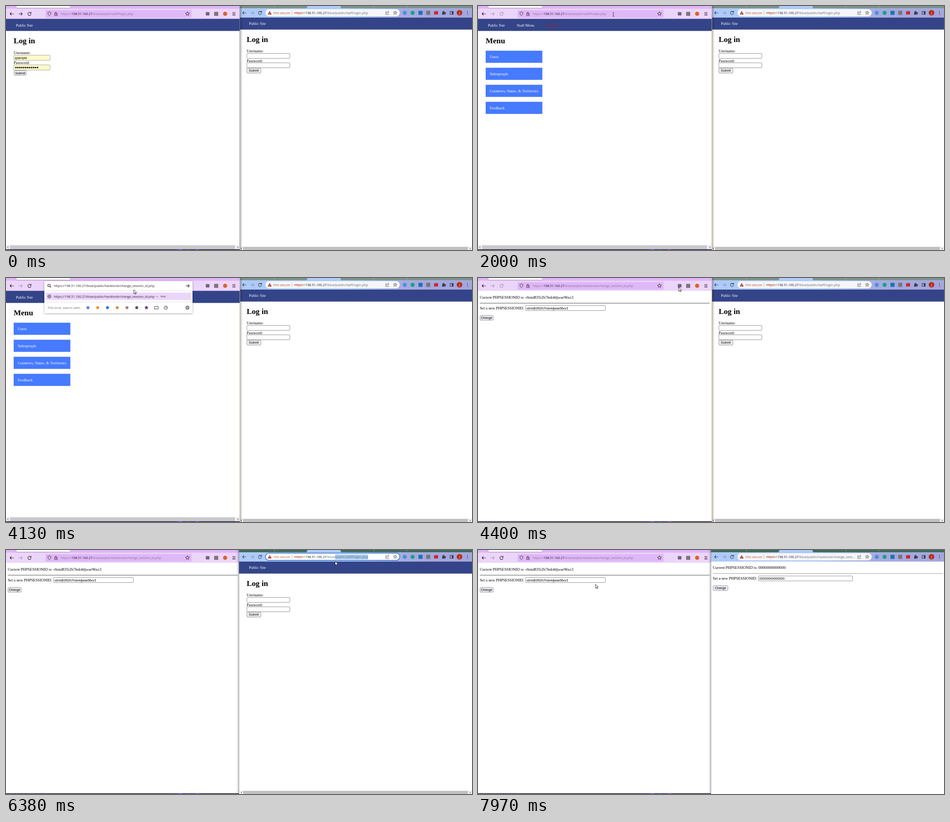
Animation, 1032 px wide and 543 px high, one loop 8 s. Source, as an HTML page:

```html
<!DOCTYPE html>
<html lang="en">
<head>
<meta charset="utf-8">
<title>Two browsers</title>
<style>
html, body { margin: 0; width: 100%; height: 100%; overflow: hidden; background: #fff; }
svg { display: block; width: 1032px; height: 543px; }
.serif { font: 8.65px "Liberation Serif", serif; }
.head { font: bold 17.2px "Liberation Serif", serif; }
.ui { font: 7.1px "Open Sans", sans-serif; }
.omni { font: 7.2px "Open Sans", sans-serif; }
.sub { font: 6.1px "Open Sans", sans-serif; }
.form { font: 7.2px "Liberation Sans", sans-serif; }
.code { font: 6.85px "Liberation Sans", sans-serif; }
.pop { filter: drop-shadow(0 1px 2px rgba(0,0,0,.35)); }
</style>
</head>
<body>
<svg id="stage" viewBox="0 0 1032 543"></svg>
<script>
const LOOP = 8000, STEP = 132.8;
const HOST = '198.51.100.27', SESSION = 'vbrnd835t2h7hsk4djwae96xz3';
const TOOL = 'public/hacktools/change_session_id.php';
const INK = '#2b2233';

const rect = (x, y, w, h, fill, more = '') =>
  `<rect x="${x}" y="${y}" width="${w}" height="${h}" fill="${fill}" ${more}/>`;
const box = (x, y, w, h, fill, line, r = 1) =>
  rect(x + .5, y + .5, w - 1, h - 1, fill, `rx="${r}" stroke="${line}" stroke-width=".8"`);
const text = (x, y, str, cls = 'serif', fill = '#000', more = '') =>
  `<text x="${x}" y="${y}" class="${cls}" fill="${fill}" ${more}>${str}</text>`;
const path = (d, color = INK, w = 1.1, fill = 'none') =>
  `<path d="${d}" fill="${fill}" stroke="${color}" stroke-width="${w}" stroke-linejoin="round"/>`;
const dot = (x, y, r, fill) => `<circle cx="${x}" cy="${y}" r="${r}" fill="${fill}"/>`;
// Visible between each pair of times
const on = (times, body) => `<g data-on="${times}">${body}</g>`;

const arrow = (x, y, dir, color) =>
  path(`M${x - 4 * dir} ${y}h${8 * dir}m${-3.3 * dir} -3.3l${3.3 * dir} 3.3l${-3.3 * dir} 3.3`, color);
const reload = (x, y, color) =>
  path(`M${x + 3} ${y - 2}A3.6 3.6 0 1 0 ${x + 3.5} ${y + 1}M${x + 3.6} ${y - 4.2}v2.9h-2.9`, color);
const star = (x, y, r, fill = 'none', color = INK) => {
  const points = Array.from({ length: 10 }, (_, i) => {
    const a = i * Math.PI / 5, q = i % 2 ? r * .45 : r;
    return `${x + q * Math.sin(a)} ${y - q * Math.cos(a)}`;
  });
  return path(`M${points.join('L')}Z`, color, .9, fill);
};
const globe = (x, y) =>
  path(`M${x - 3.8} ${y}a3.8 3.8 0 1 0 7.6 0a3.8 3.8 0 1 0 -7.6 0h7.6M${x} ${y - 3.8}q-3.6 3.8 0 7.6q3.6 -3.8 0 -7.6`, '#444', .8);
const shield = path('M92.5 14.5L96 13.2L99.5 14.5Q99.5 19.5 96 21.5Q92.5 19.5 92.5 14.5Z', INK, .9);
const lock = path('M107.8 17h5.6v4.3h-5.6zM108.9 17v-1.5a1.7 1.7 0 0 1 3.4 0v1.5', INK, .9) +
  path('M107 13.5l7.5 8', '#c8374a', .8);

const pageUrl = (x, y, tail, cls, dim, strike) => text(x, y,
  `${strike ? `<tspan fill="#c5473a" text-decoration="line-through">https:</tspan>//` : 'https://'}` +
  `<tspan fill="#221a2c">${HOST}</tspan>/blue/${tail}`, cls, dim);
const plainUrl = (x, y, tail, cls = 'ui', fill = INK, more) =>
  text(x, y, `https://${HOST}/blue/${tail}`, cls, fill, more);

const sessionPage = (x, y, id, width, lineFill, idClass, inset) =>
  text(x, y, `Current PHPSESSIONID is: ${id}`) +
  rect(x, y + 10, 509, 1, lineFill) +
  text(x, y + 24.3, 'Set a new PHPSESSIONID:') +
  box(x + 100.5, y + 15.5, width, 12, '#fff', '#777') +
  text(x + 103, y + 24.2, id, idClass) +
  box(x, y + 37, inset, 12, '#ebebee', '#858590', 2) +
  text(x + inset / 2, y + 45.6, 'Change', 'form', '#000', 'text-anchor="middle"');

const searchRow = y => text(92, y + 2.6, 'This time, search with:', 'ui', '#77727c') +
  ['#4285f4', '#e8962e', '#2878e0', '#d98b45', '#a08090', '#555'].map((c, i) =>
    dot(181.5 + i * 21.6, y, 3.2, c)).join('') +
  star(311, y, 4, '#5b3a83', '#5b3a83') +
  path(`M329 ${y - 2.8}h8v5.8h-8z`, INK, .9) +
  path(`M350.2 ${y}a3.8 3.8 0 1 0 7.6 0a3.8 3.8 0 1 0 -7.6 0M354 ${y - 2.5}v2.7h2`, INK, .9) +
  path(`M398.6 ${y}a3.3 3.3 0 1 0 6.6 0a3.3 3.3 0 1 0 -6.6 0`, INK, 1.2) +
  path(`M400.8 ${y}a1.1 1.1 0 1 0 2.2 0a1.1 1.1 0 1 0 -2.2 0`, INK, .8);

const history = [
  ['PLORVENTHAWIK » Free Retro Games Pre-installed for PC', 'plorventhawik.test', '#c0302a'],
  ['Wuqo', 'wuqo.test', '#15241b'],
  ['Change PHPSESSIONID', `${HOST}/blue/${TOOL}`],
  ['DrelMont Security Gardener - Login', 'security.drelmont.test/login.jsp'],
  ['Plim Racks Community Edition', 'http://plimracks'],
  ['DrelMont CTF', 'ctf.drelmont.test', '#55565c']
].map(([title, link, color], i) => {
  const y = 41 + i * 29;
  return (color ? dot(96, y, 3.8, color) : globe(96, y)) +
    text(106, y + 2.7, title, 'ui', '#1b1720') + text(106, y + 13.1, link, 'sub', '#74309a');
}).join('');

const leftBar =
  rect(0, 0, 518, 7, '#dfb5f7') + box(22, -3, 121, 8, '#fff', '#a48ab0') +
  rect(0, 6, 518, 22.5, '#ecd5fb') + rect(87.5, 9, 323.5, 17, '#dfb8f6', 'rx="2"') +
  arrow(13, 17.5, -1, INK) +
  on('0 1210', arrow(32, 17.5, 1, INK)) + on('1210 9000', arrow(32, 17.5, 1, '#a892b5')) +
  on('0 1210 2130 4260 5080 9000', reload(52, 17.5, INK)) +
  on('1210 2130 4260 5080', reload(52, 17.5, '#a892b5')) +
  shield + lock + star(402, 17.3, 4.5) +
  rect(442.5, 13.5, 8, 7.5, '#6d6476', 'rx="1"') + rect(461, 13, 9, 9, '#7b757f') +
  dot(485.3, 17.3, 4.6, '#d9622b') +
  path('M501.5 14.5h6.5m-6.5 2.8h6.5m-6.5 2.8h6.5') +
  on('0 1210', pageUrl(121, 20.3, 'public/staff/login.php', 'ui', '#88719a')) +
  on('1210 2260', pageUrl(121, 20.3, 'public/staff/index.php', 'ui', '#88719a')) +
  on('4260 9000', pageUrl(121, 20.3, TOOL, 'ui', '#88719a'));

const leftLogin =
  text(17, 83.3, 'Log in', 'head') + text(17, 107, 'Username:') + text(17, 128.7, 'Password:') +
  box(17, 109, 81, 12.5, '#fffbc9', '#8f8f9d') + text(19.5, 118, 'qsample', 'form') +
  box(17, 130.5, 81, 12.5, '#fffbc9', '#8f8f9d') +
  Array.from({ length: 12 }, (_, i) => dot(22 + i * 4.35, 137, 1.75, '#111')).join('') +
  box(17, 143, 28.5, 12, '#e9e9ed', '#8f8f9d', 2) +
  on('940 1210', box(17, 143, 28.5, 12, '#d0d0d7', '#767680', 2)) +
  text(20.2, 151.5, 'Submit', 'form');

const leftMenu =
  text(86, 46, 'Staff Menu', 'serif', '#fff') + text(151, 46, 'Log out', 'serif', '#c4101c') +
  text(17, 83.3, 'Menu', 'head') +
  ['Users', 'Salespeople', 'Countries, States, &amp; Territories', 'Feedback'].map((name, i) =>
    rect(17, 99.5 + i * 37.9, 125.5, 27, '#467aff') +
    text(26, 115.8 + i * 37.9, name, 'serif', '#fff')).join('');

const left = rect(0, 0, 518, 543, '#fff') + leftBar +
  on('0 4400', rect(0, 28.5, 518, 27, '#334488') + text(22, 46, 'Public Site', 'serif', '#fff') +
    rect(0, 532, 518, 10, '#f0f0f0') + rect(9, 532.5, 498, 9, '#c9c9cb') +
    path('M5.5 534.8l-2.2 2.2l2.2 2.2M512.3 534.8l2.2 2.2l-2.2 2.2', '#333', 1)) +
  on('0 1210', leftLogin) + on('1210 4400', leftMenu) +
  on('4400 9000', sessionPage(4, 45.5, SESSION, 178, '#4a4a4a', 'code', 30)) +
  rect(0, 541.5, 518, 1.5, '#1a1038') +
  [375, 383, 398, 420].map((x, i) => rect(x, 541.5, 7, 1.5, i % 2 ? '#8a48d8' : '#4a49a8')).join('');

const leftPopup = on('2260 4260',
  on('2260 3200',
    rect(85, 7, 328, 226.5, '#fff', 'rx="2" class="pop"') + shield + lock + star(402, 17.3, 4.5) +
    plainUrl(121, 20.3, 'public/staff/index.php') +
    '<g clip-path="url(#marked)">' + rect(200, 12.5, 84.5, 10.5, '#0a72cf') +
    plainUrl(121, 20.3, 'public/staff/index.php', 'ui', '#fff') + '</g>' +
    rect(88, 28, 322, .8, '#d6d3d9') + history + rect(88, 207, 322, .8, '#d6d3d9') + searchRow(221)) +
  on('3200 4260',
    rect(85, 7, 328, 71.5, '#fff', 'rx="2" class="pop"') +
    path('M92.6 16.4a2.7 2.7 0 1 0 5.4 0a2.7 2.7 0 1 0 -5.4 0M97.2 18.4l2.8 2.8') +
    plainUrl(106, 20.3, TOOL) + arrow(402, 17.5, 1, INK) + rect(88, 28, 322, .8, '#d6d3d9') +
    rect(88.5, 32.5, 321, 16.5, '#ecd5fa', 'rx="2"') + globe(96, 41) + plainUrl(106, 43.6, TOOL) +
    text(331, 43.4, '—', 'ui', '#555') + text(342, 43.3, 'Visit', 'sub', '#222') +
    rect(88, 53, 322, .8, '#d6d3d9') + searchRow(66)));

const tabs = fill => rect(516, 0, 516, 5.5, fill) +
  [594, 814, 887].map(x => rect(x, 0, 1, 2, '#c3cfca')).join('');

const rightBar =
  on('0 5080', tabs('#7c948f')) + on('5080 9000', tabs('#3f6a5c')) +
  rect(516, 5.3, 516, 20.5, 'url(#sky)') +
  path('M663 5.5Q667 5 667.5 0H740.5Q741 5 745 5.5Z', 'none', 0, '#aecbf8') +
  arrow(527.8, 15.2, -1, '#33425c') + arrow(545.3, 15.2, 1, '#7d95c6') + reload(562.5, 15.2, '#33425c') +
  rect(574.5, 7, 297.5, 16, '#f5f6f9', 'rx="8"') +
  on('5080 7320', rect(574.5, 7, 297.5, 16, '#fff', 'rx="8" stroke="#2d6fd0" stroke-width="1.4"') +
    rect(802, 9.8, 0, 11, '#a6cbf3', 'id="picked"')) +
  path('M584 11.5l4 7h-8z', '#b63a2e', .6, '#b63a2e') + rect(583.6, 14, .9, 2.4, '#fff') +
  text(592.7, 17.8, 'Not secure', 'omni', '#c5473a') + rect(633, 10.5, .8, 9.5, '#b9a9b0') +
  on('0 6790', pageUrl(638.5, 17.8, 'public/staff/login.php', 'omni', '#666a72', true)) +
  on('7320 9000', pageUrl(638.5, 17.8, 'public/hacktools/change_sess…', 'omni', '#666a72', true)) +
  path('M843 13h-2v6h6v-2.5M843 16.5q.3 -3.5 4.5 -3.5m-1.8 -2l2 2l-2 2', '#555', .9) +
  star(861.8, 15.1, 4, 'none', '#444') +
  dot(883, 15.2, 4.5, '#4c8fd8') + dot(900.5, 15.2, 4.5, '#16a383') +
  rect(913.5, 10.7, 9, 9, '#1f6fb4') + rect(930.5, 10.7, 9, 9, '#77757c') +
  rect(948, 11.5, 9, 7.5, '#c62a2f', 'rx="1.5"') +
  rect(966, 12.8, 6.5, 6.5, '#3d4055', 'rx=".8"') + dot(969, 12.4, 1.5, '#3d4055') + dot(973, 16, 1.5, '#3d4055') +
  path('M983.5 12h7v6.5h-7z', '#33364a') + rect(987.5, 12, 3, 6.5, '#33364a') +
  dot(1004.3, 15.2, 6.2, '#b52c1d') + text(1004.3, 17.8, 'J', 'omni', '#fff', 'text-anchor="middle"') +
  [12, 15.2, 18.4].map(y => dot(1022, y, .85, '#33364a')).join('');

const rightLogin =
  rect(516, 25.7, 516, 26.8, '#334488') + text(538, 42.3, 'Public Site', 'serif', '#fff') +
  text(533, 79.8, 'Log in', 'head') + text(533, 103.3, 'Username:') + text(533, 124.6, 'Password:') +
  box(533, 105, 96, 12, '#fff', '#767676') + box(533, 126, 96, 12, '#fff', '#767676') +
  box(533, 137.7, 32, 12, '#efefef', '#767676', 2) + text(537.6, 146.2, 'Submit', 'form') +
  rect(516, 535.5, 516, 7.5, '#f1f1f1') + rect(525, 536, 498, 7, '#c1c1c1') +
  path('M522 537.5l-2 2l2 2zM1027.5 537.5l2 2l-2 2z', 'none', 0, '#555');

const rightPopup = on('6790 7320',
  rect(569, 4, 304, 70, '#fff', 'rx="7" class="pop"') + globe(584, 15) +
  plainUrl(595, 17.8, TOOL, 'omni') + rect(569, 26, 304, 21, '#e8eaed') +
  globe(584, 36.5) + plainUrl(595, 39.2, TOOL, 'omni', '#1a56c4') +
  path('M581.2 56.4a2.5 2.5 0 1 0 5 0a2.5 2.5 0 1 0 -5 0M585.6 58.2l2.6 2.6', '#555', 1) +
  plainUrl(595, 60.2, TOOL, 'omni'));

const right = '<g clip-path="url(#front)">' + rect(516, 0, 516, 543, '#fff') + rightBar +
  on('0 7320', rightLogin) +
  on('7320 9000', sessionPage(520, 41.8, '0'.repeat(14), 209.5, '#9a9a9a', 'form', 34)) +
  rightPopup + '</g>';

// The window in front casts its shadow on the other
const edges =
  on('0 5080', rect(518, 0, 6, 543, 'url(#shadeRight)')) +
  on('0 1210', rect(517.3, 0, .9, 543, '#8b8b90')) +
  on('1210 5080', rect(517.5, 0, 1, 543, '#c8aa82')) +
  on('5080 9000', rect(510, 0, 6, 543, 'url(#shadeLeft)') + rect(515.3, 0, .9, 543, '#85858a'));

const pointer = '<g id="pointer">' +
  on('2260 2790 5200 5590', dot(1, 0, 8, 'rgba(255,228,0,.6)')) +
  on('2790 3050', dot(-.5, 1, 6, 'rgba(255,228,0,.5)')) +
  on('130 1960 3200 4900 5860 9000', path('M0 0V9L2.1 7.1L3.5 10.2L4.9 9.6L3.5 6.6H6.3Z', '#111', .8, '#fff')) +
  on('1960 3200 4900 5860', path('M-1.6 -4h3.2M0 -4V4M-1.6 4h3.2', '#333', .9)) + '</g>';

const stage = document.getElementById('stage');
stage.innerHTML = `<defs>
  <linearGradient id="sky"><stop stop-color="#aecbf8"/><stop offset=".45" stop-color="#aecbf8"/>
    <stop offset=".72" stop-color="#a6aae0"/><stop offset="1" stop-color="#a5a6dc"/></linearGradient>
  <linearGradient id="shadeLeft"><stop stop-opacity="0"/><stop offset="1" stop-opacity=".2"/></linearGradient>
  <linearGradient id="shadeRight"><stop stop-opacity=".28"/><stop offset="1" stop-opacity="0"/></linearGradient>
  <clipPath id="front"><rect id="frontBox" y="0" width="520" height="543"/></clipPath>
  <clipPath id="marked"><rect id="markedBox" y="10" height="16"/></clipPath>
</defs>` + left + right + edges + leftPopup + pointer;

// Pointer keys: time, x, y
const keys = [
  [130, 906, 511], [260, 522, 397], [660, 76, 226], [1060, 32, 148], [1210, 32, 148],
  [1600, 240, 90], [1990, 300, 19], [2260, 284, 18], [2520, 213, 20], [3180, 213, 20],
  [3590, 276, 21], [3980, 277, 21], [4110, 283, 26], [4260, 283, 26], [4650, 798, 9],
  [4780, 857, 10], [4910, 818, 20], [5080, 812, 18], [5200, 803, 17], [5575, 714, 16],
  [5860, 729, 17], [6110, 729, 25], [7300, 729, 25], [7965, 260, 76]
];
const pointerAt = t => {
  const i = keys.findIndex(k => k[0] > t);
  if (i < 1) return (i ? keys[keys.length - 1] : keys[0]).slice(1);
  const a = keys[i - 1], b = keys[i], p = (t - a[0]) / (b[0] - a[0]);
  return [a[1] + (b[1] - a[1]) * p, a[2] + (b[2] - a[2]) * p];
};

const parts = [...stage.querySelectorAll('[data-on]')].map(node =>
  ({ node, times: node.dataset.on.split(' ').map(Number) }));
const byId = id => document.getElementById(id);
const setSpan = (id, from, to) => {
  byId(id).setAttribute('x', from);
  byId(id).setAttribute('width', to - from);
};
const clamp = (v, lo, hi) => Math.min(hi, Math.max(lo, v));

function draw(now) {
  const t = now % LOOP;
  for (const { node, times } of parts)
    node.style.display = times.filter(x => x <= t).length % 2 ? '' : 'none';
  const [x, y] = pointerAt(Math.floor((t + 8) / STEP) * STEP);
  byId('pointer').setAttribute('transform', `translate(${x} ${y})`);
  setSpan('markedBox', clamp(x, 212, 285), 285);
  setSpan('picked', clamp(x, 714, 802), 802);
  byId('frontBox').setAttribute('x', t < 5080 ? 518 : 516);
}
const tick = () => { draw(performance.now()); requestAnimationFrame(tick); };
tick();
</script>
</body>
</html>
```
